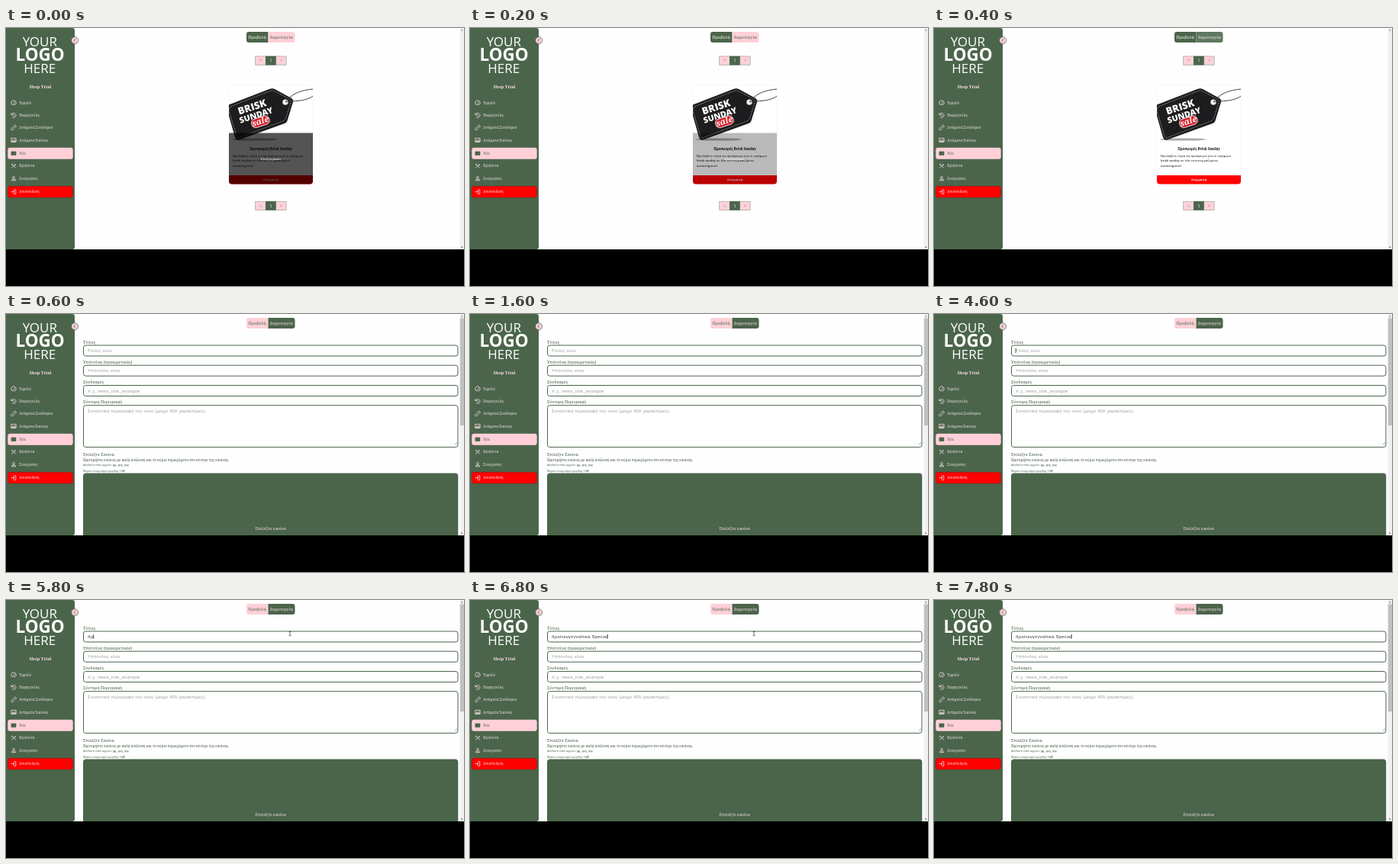
Write an HTML page that moves like this. It is 600 px wide and 338 px high and loops after 8 s.

```html
<!DOCTYPE html>
<html lang="el">
<head>
<meta charset="utf-8">
<title>Admin panel</title>
<style>
html, body { margin: 0; width: 100%; height: 100%; overflow: hidden; background: #000 }
svg { display: block; width: 100vw; height: 100vh }
text { font: 5.35px "Noto Serif", serif; fill: #3c533d; white-space: pre }
.mid { text-anchor: middle }
.logo text { font: 17px "Open Sans", sans-serif; fill: #fff; text-anchor: middle }
.menu text { font-size: 4.45px; fill: #f8e4e4 }
.menu .on { fill: #4b654b }
.icon { fill: none; stroke: #f8e4e4; stroke-width: .8; stroke-linejoin: round }
.icon.on { stroke: #4b654b }
.card text { font-size: 4.05px; fill: #111 }
.tag text { font: 800 13px "Open Sans", sans-serif; fill: #fff; text-anchor: middle }
.field { fill: #fff; stroke: #4b654b }
.ph { font: 5.7px "Liberation Sans", Arial, sans-serif; letter-spacing: .3px; fill: #959795 }
#typed { fill: #333 }
</style>
</head>
<body>
<svg viewBox="0 0 600 338">
  <rect width="600" height="290" fill="#fefefe"/>
  <rect x="594.5" width="5.5" height="290" fill="#f1f1f1"/>
  <path d="M595.8 3.6l1.4-1.6 1.4 1.6zM595.8 286.6l1.4 1.6 1.4-1.6z" fill="#666"/>

  <path d="M0 0H87q3 0 3 3V287q0 3-3 3H0z" fill="#4b654b"/>
  <g class="logo">
    <text x="44.3" y="24">YOUR</text>
    <text x="44.6" y="42.6" style="font-size:22.5px;font-weight:700">LOGO</text>
    <text x="44.3" y="59">HERE</text>
  </g>
  <text class="mid" x="45" y="79.3" style="font-size:5.5px;font-weight:700;fill:#fbdfe2">Shop Trial</text>
  <g class="menu" id="menu">
    <rect x="2.3" y="156.8" width="85.4" height="15" rx="3" fill="#ffd0d9"/>
    <rect x="2.3" y="207.3" width="85.2" height="14.6" rx="3" fill="#f00" stroke="#8d1a12" stroke-width=".6"/>
  </g>
  <circle cx="90.2" cy="16.2" r="4.5" fill="#ffd0d9" stroke="#4b654b" stroke-width=".7"/>
  <path d="M91.2 13.9L88.9 16.2l2.3 2.3" fill="none" stroke="#4b654b" stroke-width=".8"/>

  <path id="tabL" d="M343.5 5H318q-3 0-3 3v8q0 3 3 3h25.5z"/>
  <path id="tabR" d="M343.5 5H375.5q3 0 3 3v8q0 3-3 3h-32z"/>
  <text id="textL" class="mid" x="329.2" y="14.2" style="font-size:5.5px">Προβολή</text>
  <text id="textR" class="mid" x="360.8" y="14.2" style="font-size:5.5px">Δημιουργία</text>

  <g id="list">
    <g id="pager">
      <rect x="326.7" y="37" width="40.4" height="11.4" fill="#ffd0d9" stroke="#8d9a8d" stroke-width=".6"/>
      <rect x="340" y="36.8" width="13.8" height="11.8" fill="#4b654b"/>
      <g class="mid" style="font-size:4px">
        <text x="333.4" y="44.4" style="font-size:4.4px">&lt;</text>
        <text x="346.9" y="44.4" style="font-size:4.4px;fill:#fff">1</text>
        <text x="360.4" y="44.4" style="font-size:4.4px">&gt;</text>
      </g>
    </g>
    <use href="#pager" y="190.2"/>
    <g class="card">
      <rect x="292" y="75" width="110" height="129.6" rx="4" fill="#fff" stroke="#eee" stroke-width=".5"/>
      <clipPath id="photo"><rect x="292" y="75" width="110" height="74"/></clipPath>
      <g class="tag" clip-path="url(#photo)">
        <ellipse cx="326" cy="146" rx="31" ry="1.6" fill="#aaa"/>
        <path d="M291 101L345 80q4-1.5 7 0L374 92q3 2 2 5L369 120q-1 4-4 5L306 146.300q-4 1.500-6-3L290 108z" fill="#1d1d1f"/>
        <path d="M294 103L346 82.500q3-1 5 0L371 93q3 2 2 5L366.500 118q-1 3-4 4L306 143.500q-3 1-4-2L292 108z" fill="none" stroke="#ddd" stroke-width=".6" stroke-dasharray="1.6 1.2"/>
        <circle cx="366" cy="97.200" r="3.600" fill="#fff" stroke="#999" stroke-width=".8"/>
        <path d="M366 97C374 86 387 81 403 80M366 97C378 95 390 97 403 89" fill="none" stroke="#333" stroke-width=".9"/>
        <g transform="rotate(-18 325 110)">
          <text x="324.500" y="107.500">BRISK</text>
          <text x="326" y="118.600" style="font-size:10.800px">SUNDAY</text>
          <rect x="317" y="119" width="24" height="11.500" rx="5" fill="#d9202a" stroke="#fff" stroke-width=".8"/>
          <text x="329" y="127.800" style="font:italic 700 11px 'Noto Serif',serif">sale</text>
        </g>
      </g>
      <text class="mid" x="347" y="160" style="font-size:4.4px;font-weight:700">Προσφορές Brisk Sunday</text>
      <text x="297" y="169">Προλάβετε τώρα τις προσφορές για το τριήμερο</text>
      <text x="297" y="175.3">brisk sunday σε όλα τα συνεργαζόμενα</text>
      <text x="297" y="181.6">καταστήματα!</text>
      <path id="bar" d="M292 193h110v7.600q0 4-4 4H296q-4 0-4-4z" fill="#f00"/>
      <text class="mid" x="347" y="200.300" style="font-weight:700;fill:#fff">Διαγραφή</text>
      <g id="shade">
        <path d="M292 137.500h110v63.100q0 4-4 4H296q-4 0-4-4z" fill="#000" fill-opacity=".67"/>
        <text class="mid" x="347" y="172.800" style="font-size:4.300px;fill:#fff">Επεξεργασία</text>
      </g>
    </g>
  </g>

  <g id="form">
    <rect x="594.9" y="5.500" width="5.100" height="140.500" fill="#c1c1c1"/>
    <g id="fields"></g>
    <path d="M587.500 171.500l3.500-3.500M589.500 171.500l1.500-1.500" stroke="#777" stroke-width=".5"/>
    <text id="typed" class="ph" x="107" y="50"></text>
    <path id="caret" d="M0 45v6" stroke="#111" stroke-width=".7"/>
    <path id="beam" d="M370.600 41.300h2.800M370.600 46.700h2.800M372 41.300v5.400" stroke="#111" stroke-width=".6"/>
    <text x="101" y="186">Επιλέξτε Εικόνα</text>
    <text x="101" y="192.800" style="font-size:4.600px">Προτιμήστε εικόνες με καλή ανάλυση και το κύριο περιεχόμενο στο κέντρο της εικόνας.</text>
    <text x="101" y="199.200" style="font-size:3.100px">Αποδεκτοί τύποι αρχείων .jpg, .jpeg, .png</text>
    <text x="101" y="206.600" style="font-size:3.100px">Μέγιστο επιτρεπόμενο μέγεθος: 2 MB</text>
    <path d="M101 290V212.500q0-4 4-4H588.300q4 0 4 4V290z" fill="#4b654b"/>
    <text class="mid" x="346.700" y="283.200" style="fill:#ffe3e6">Επιλέξτε εικόνα</text>
  </g>
</svg>
<script>
const $ = id => document.getElementById(id);
const GREEN = '#4b654b', PINK = '#ffd0d9';

// label, row centre, icon path around 0,0
const menu = [
  ['Ταμπλό', 98, 'M-2.300 2.300A3.200 3.200 0 1 1 2.300 2.300ZM0 1L1.400-1.200'],
  ['Παραγγελίες', 114.4, 'M-2.600-1A2.900 2.900 0 1 1-2 2M-3.200-3v2.300h2.300M0-1.500V.300L1.200 1'],
  ['Αιτήματα Συνδέσμου', 130.6, 'M-.800.800L.800-.800M-.600-1.400L.800-2.800A1.400 1.400 0 0 1 2.800-.800L1.400.600M.600 1.400L-.800 2.800A1.400 1.400 0 0 1-2.800.800L-1.400-.600'],
  ['Αιτήματα Εικόνας', 146.9, 'M-3.200-2.500H3.200V2.500H-3.200ZM-2.500 1.800L-.800-.200.300 1 1.500-.800 2.800 1.800Z'],
  ['Νέα', 164.2, 'M-3-2.200H3V2.200H-3ZM-2-1H0V.600H-2ZM1-1H2.200M1 .400H2.200'],
  ['Προϊόντα', 180.7, 'M-2.700 2.700L2.600-2.700M2.700 2.700L-2.700-2.700M.800-.800L2.800-1M-2.700-1.500L-1.200-2.700'],
  ['Συνεργάτες', 197, 'M0-2.700A1.300 1.300 0 1 1-.010-2.700M-2.600 2.700Q-2.400.600 0 .600T2.600 2.700Z'],
  ['Αποσύνδεση', 214.6, 'M0-2.700H2.800V2.700H0M-3.200 0H1M-.800-1.700L1 0-.800 1.700']
];
$('menu').innerHTML += menu.map(([label, y, d]) => {
  const on = label == 'Νέα' ? 'on' : '';
  return `<path class="icon ${on}" transform="translate(10 ${y})" d="${d}"/>
    <text class="${on}" x="17.300" y="${y + 1.6}">${label}</text>`;
}).join('');

const fields = [
  ['Τίτλος', 'Τίτλος νέου', 41, 14],
  ['Υπότιτλος (προαιρετικός)', 'Υπότιτλος νέου', 67.2, 14],
  ['Σύνδεσμος', 'π.χ. news_title_example', 93.5, 14],
  ['Σύντομη Περιγραφή', 'Συνοπτική περιγραφή του νέου (μέχρι 400 χαρακτήρες)', 119.7, 54.7]
];
$('fields').innerHTML = fields.map(([label, hint, y, h]) =>
  `<text x="101" y="${y - 2.5}">${label}</text>
   <rect class="field" x="101.500" y="${y}" width="490.500" height="${h}" rx="3"/>
   <text class="ph" x="107" y="${y + 9}">${hint}</text>`).join('');
const hint = document.querySelector('.ph');

const show = (el, on) => el.style.display = on ? '' : 'none';
const within = (t, ...spans) => spans.some(([a, b]) => t >= a && t < b);

function tab(side, fill, ink) {
  $('tab' + side).style.fill = fill;
  $('text' + side).style.fill = ink;
}

function draw(now) {
  const t = now % 8000, form = t >= 600;
  show($('list'), !form);
  show($('form'), form);
  $('shade').style.opacity = t < 200 ? 1 : t < 400 ? .4 : 0;
  tab('L', form ? PINK : GREEN, form ? GREEN : '#fff');
  tab('R', form ? GREEN : t < 400 ? PINK : '#5d7961', t < 400 ? GREEN : '#ffe3e6');

  const typed = t < 5400 ? '' : t < 5800 ? 'Χ' : t < 6000 ? 'Χρ' : t < 6800 ? 'Χρι' : 'Χριστουγεννιάτικα Special';
  $('typed').textContent = typed;
  show(hint, !typed);
  const x = 107 + (form && typed ? $('typed').getComputedTextLength() : 0);
  $('caret').setAttribute('transform', `translate(${x})`);
  show($('caret'), within(t, [4600, 5200], [5400, 5600], [5800, 6200], [6800, 7200], [7800, 8000]));
  show($('beam'), within(t, [4800, 7400]));
  requestAnimationFrame(() => draw(performance.now()));
}
draw(0);
</script>
</body>
</html>
```
